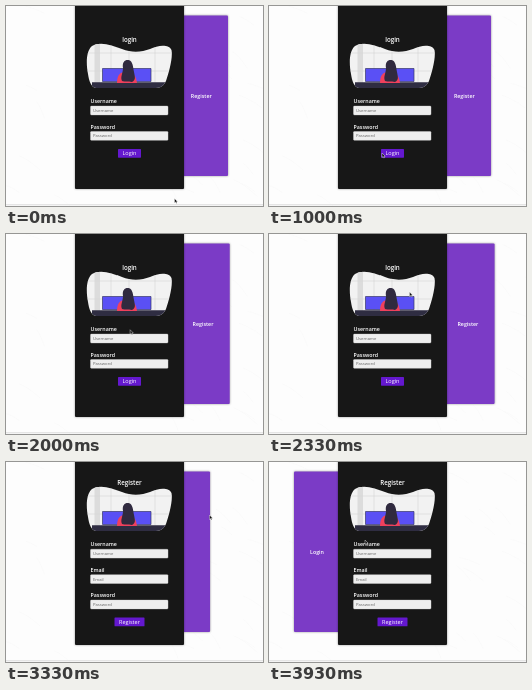
Animation of 257x200 px, one loop 3.99 s. Source, as an HTML page:

```html
<!DOCTYPE html>
<html lang="en">
<head>
<meta charset="utf-8">
<title>Login and register card</title>
<style>
  html, body { margin: 0; width: 100%; height: 100%; overflow: hidden; background: #fdfdfd; }
  svg { display: block; width: 100vw; height: 100vh; }
  text { font: 600 5.3px "Open Sans", "Noto Sans", sans-serif; fill: #fff; }
  .title { font-size: 6.2px; }
  .mid { text-anchor: middle; }
  .hint { font-size: 4.2px; font-weight: 400; fill: #666; }
  .action { font-size: 5.5px; font-weight: 500; }
  .field { fill: #eee; stroke: #d4d4d4; stroke-width: .4; }
  .button { fill: #6418cf; }
  .shade { filter: drop-shadow(0 .3px 1.2px #0006); }
</style>
</head>
<body>
<svg viewBox="0 0 257 200">
  <defs>
    <clipPath id="blob">
      <path d="M82 68C80 58 80 45 86 40C94 35 106 39 116 43C126 47 136 46 144 43C152 39 163 38 165.5 44C167 52 163 66 160 75C157 82 152 82 145 82H90C85 81 83 75 82 68Z"/>
    </clipPath>
  </defs>
  <g id="marble" fill="none" stroke="#f8f8f8" stroke-width=".6"></g>
  <path d="M0 198.8H257" stroke="#dcdcdc"/>

  <g id="panel">
    <rect class="shade" x="132" y="9.5" width="90" height="160.5" rx="1" fill="#7b3bc6"/>
    <text class="mid" id="side" y="92"></text>
  </g>

  <rect class="shade" x="69" y="-3" width="109" height="186" rx="1" fill="#171717"/>
  <g id="art">
    <g clip-path="url(#blob)">
      <path d="M78 34H168V86H78Z" fill="#f2f2f2"/>
      <path d="M88.5 34H94V77H88.5Z" fill="#dcdcdc"/>
      <path d="M78 47H168M78 65H168M105 34V76M123 34V76M149 34V76" stroke="#d6d6d6" stroke-width=".6" fill="none"/>
      <path d="M86 76.3H168V86H86Z" fill="#2f2d42"/>
      <path d="M96.5 62.5H117.5V75.5H96.5ZM124 62.5H145V75.5H124Z" fill="#5a50f5" stroke="#39386a" stroke-width=".7"/>
      <path d="M111 77C111 69 114 66 120 66C127 66 130 69 131 77Z" fill="#f0405c"/>
      <path d="M116 75C114 71 117 67 117 62C116 56 119 53.5 122.5 54C127 55 127 61 128 66C129 71 130 74 126 76C122 75 119 76 116 75Z" fill="#302a3f"/>
    </g>
  </g>
  <g id="login"></g>
  <g id="register"></g>

  <g id="cursor">
    <path id="arrow" d="M0 0V4.5L1.1 3.5L1.8 5L2.6 4.6L1.9 3.2H3.2Z" fill="#111" stroke="#fff" stroke-width=".4"/>
    <path id="beam" d="M-1 -2H1M0 -2V3M-1 3H1" fill="none" stroke="#555" stroke-width=".6"/>
  </g>
</svg>
<script>
const LOOP = 3990, SWAP = 3240, SLIDE = 350;
const $ = id => document.getElementById(id);
const clamp = u => Math.min(1, Math.max(0, u));
const ease = u => u * u * (3 - 2 * u);

const field = (name, y) => `
  <text x="84.5" y="${y}">${name}</text>
  <rect class="field" x="84.5" y="${y + 3}" width="77.5" height="8.8" rx=".8"/>
  <text class="hint" x="87" y="${y + 8.9}">${name}</text>`;

const form = (title, titleY, names, y, button, width) => {
  const end = y + names.length * 25.4;
  return `<text class="title mid" x="123.5" y="${titleY}">${title}</text>` +
    names.map((name, i) => field(name, y + i * 25.4)).join("") +
    `<rect class="button" x="${123.5 - width / 2}" y="${end - 5}" width="${width}" height="8.8" rx=".6"/>
     <text class="mid action" x="123.5" y="${end + 1.3}">${button}</text>`;
};
$("login").innerHTML = form("login", 35.9, ["Username", "Password"], 97.1, "Login", 23);
$("register").innerHTML = form("Register", 22.9, ["Username", "Email", "Password"], 84.3, "Register", 30);

// Faint marble veins
let seed = 7;
const random = () => (seed = seed * 16807 % 2147483647) / 2147483647;
const veins = Array.from({ length: 34 }, () => {
  const x = random() * 257, y = random() * 195, dx = 8 + random() * 18, dy = 4 + random() * 14;
  return `M${x} ${y}q${dx * .4} ${dy * .2} ${dx} ${dy}`;
});
$("marble").innerHTML = `<path d="${veins.join("")}"/>`;

// Time, x, y
const path = [
  [0, 168.5, 192.5], [70, 168, 191], [530, 139.8, 152.5], [800, 97, 149],
  [1000, 113, 147], [1200, 113, 147], [1600, 148, 133], [1730, 148, 132],
  [2100, 119, 88], [2330, 140.5, 58], [2520, 100, 60], [2930, 200, 51.5],
  [3330, 203.5, 53], [3420, 203.5, 53], [3800, 121, 75], [3930, 96, 78], [LOOP, 96, 78]
];
const pointer = t => {
  const i = path.findIndex(p => p[0] > t), [t0, x0, y0] = path[i - 1], [t1, x1, y1] = path[i];
  const u = ease((t - t0) / (t1 - t0));
  return [x0 + (x1 - x0) * u, y0 + (y1 - y0) * u];
};

// Start, end, reach of each sideways nudge
const nudges = [[130, 1030, 3.4], [1800, 2680, 4], [2935, 3270, 4]];
const nudge = t => nudges.reduce((sum, [a, b, reach]) =>
  sum + reach * Math.sin(Math.PI * clamp((t - a) / (b - a))) ** 2, 0);

function draw(now) {
  const t = now % LOOP, swapped = t >= SWAP;
  const shift = nudge(t) - 107 * ease(clamp((t - SWAP) / SLIDE));
  $("panel").setAttribute("transform", `translate(${shift})`);
  $("side").textContent = swapped ? "Login" : "Register";
  $("side").setAttribute("x", swapped ? 155 : 195.3);
  $("art").setAttribute("transform", `translate(0 ${swapped ? -13 : 0})`);
  $("login").style.display = swapped ? "none" : "";
  $("register").style.display = swapped ? "" : "none";

  const [x, y] = pointer(t);
  const typing = !swapped && x > 84 && x < 162 && (y > 125 && y < 135 || y > 100 && y < 109);
  $("cursor").setAttribute("transform", `translate(${x} ${y})`);
  $("arrow").style.display = typing ? "none" : "";
  $("beam").style.display = typing ? "" : "none";
  requestAnimationFrame(draw);
}
draw(performance.now());
</script>
</body>
</html>
```
